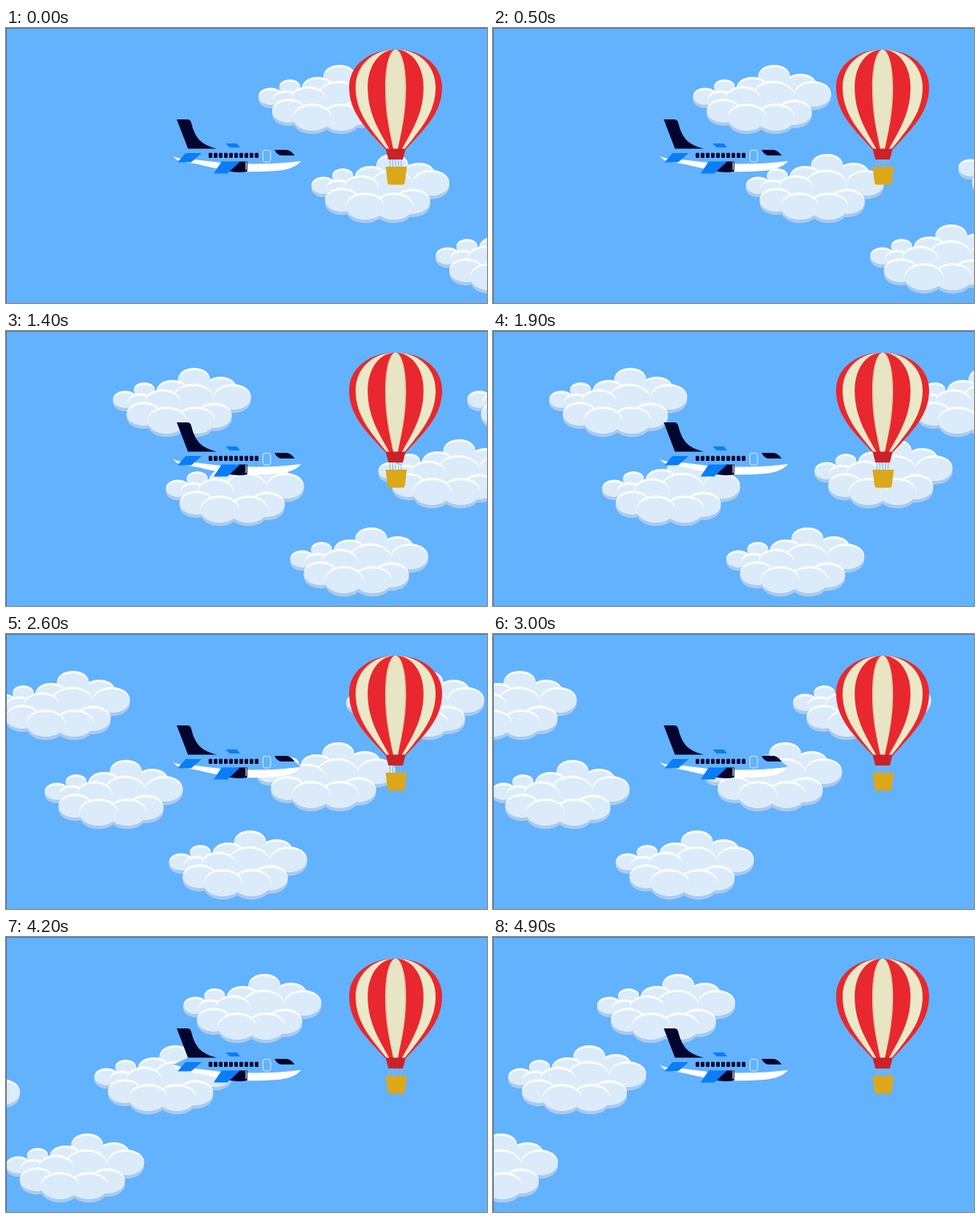
An HTML page that plays this animation: 600x343 px, repeating every 5 s.

```html
<!DOCTYPE html>
<html lang="en">
<head>
<meta charset="utf-8">
<title>Plane, balloon and clouds</title>
<style>
html, body { margin: 0; width: 100%; height: 100%; overflow: hidden; background: #62b2fe; }
svg { display: block; width: 100vw; height: 100vh; }
</style>
</head>
<body>
<svg viewBox="0 0 600 343" preserveAspectRatio="none">
  <defs>
    <g id="cloud"></g>
    <path id="bag" d="M0 27C34 27 58 47 58 74C58 106 36 126 13 151H-13C-36 126 -58 106 -58 74C-58 47 -34 27 0 27Z"/>
  </defs>
  <rect width="600" height="343" fill="#62b2fe"/>
  <g id="sky"></g>

  <g id="plane">
    <path fill="#62b2fe" d="M209 159L228 150H334Q352 150 368 166L310 172L240 168Z"/>
    <path fill="#fff" d="M208 159Q213 164 235 164L268 168Q320 172 368 166Q360 176 338 178Q315 180 290 179Q262 176 240 170L222 167Q212 166 208 159Z"/>
    <path fill="#04052e" d="M213 114H226Q230 114 231 118Q235 136 245 143Q252 148 263 150.5H227Z"/>
    <g fill="#0b7df7">
      <path d="M224 156H244L231 167.5H214Z"/>
      <path d="M274 144H288L292 149H279Z"/>
    </g>
    <path fill="#04052e" d="M290 166.5H301V179Q290 181 277 178.5Z"/>
    <path stroke="#fff" d="M299.5 167V177"/>
    <path fill="#0b7df7" d="M269 166.5H292L276 181.5H259Z"/>
    <g id="windows" fill="#04052e"></g>
    <rect x="320.5" y="152.5" width="9.5" height="14.5" rx="2.5" fill="none" stroke="#d5eaff"/>
    <path fill="#04052e" d="M335 152H350Q356 153 360 159H343Q338 158 335 152Z"/>
  </g>

  <g id="balloon" transform="translate(486)">
    <path stroke="#7db9ee" d="M-7 164V174M-3.5 164V174M0 164V174M3.5 164V174M7 164V174"/>
    <use href="#bag" fill="#e9272e"/>
    <use href="#bag" fill="#ece9c9" transform="scale(.86 1)"/>
    <use href="#bag" fill="#e9272e" transform="scale(.6 1)"/>
    <use href="#bag" fill="#d9d2ac" transform="scale(.225 1)"/>
    <use href="#bag" fill="#e8e5c4" transform="scale(.19 1)"/>
    <path fill="#cb2129" d="M-12.5 150.5H12.5L9 164H-9Z"/>
    <path fill="#dba71b" d="M-12.5 173H14L11.5 193Q11 195.5 8.500 195.5H-6.5Q-9.500 195.5 -10 193Z"/>
  </g>
  <path fill="none" stroke="#55789b" d="M0 .5H600M.5 0V343"/>
</svg>
<script>
const LOOP = 5000, STEP = 100;
const get = id => document.getElementById(id);

// Cloud lobes, back to front: x, y, radius
const lobes = [
  [134, 25, 20], [149, 36, 23], [101, 14, 20], [74, 29, 20], [39, 27, 13], [15, 39, 15], [34, 43, 16],
  [100, 38, 26], [62, 42, 22], [38, 57, 21], [126, 59, 22], [103, 65, 24], [67, 65, 24]
];
const lobe = (x, y, rx, ry, fill) =>
  `<ellipse cx="${x}" cy="${y}" rx="${rx}" ry="${ry}" fill="${fill}"/>`;
const shade = ([x, y, r]) => lobe(x, y + 4.5, r, r * .7, '#aacbeb');
const puff = ([x, y, r]) =>
  lobe(x, y, r, r * .7, '#fbfdff') + lobe(x, y + 1.5, r, r * .7 - 1.5, '#dbebf9');

get('cloud').innerHTML =
  lobes.map(shade).join('') + lobe(92, 48, 48, 20, '#dbebf9') + lobes.map(puff).join('');

// Starting place of each cloud
const starts = [[315, 46], [381, 157], [536, 245], [646, 135], [757, 46]];
get('sky').innerHTML = starts.map(() => '<use href="#cloud"/>').join('');
const clouds = [...get('sky').children];

get('windows').innerHTML = Array.from({ length: 10 }, (_, i) =>
  `<rect x="${252.8 + i * 6.4}" y="155.8" width="4.5" height="6.2" rx="1"/>`).join('');

// Steady drift to the left with a slight sway
const distance = t => .128 * t + 2.3 * Math.sin(2 * Math.PI * t / LOOP);

function draw(now) {
  const t = Math.floor(now % LOOP / STEP) * STEP;
  const d = distance(t);
  clouds.forEach((cloud, i) => {
    const [x, y] = starts[i];
    cloud.setAttribute('transform', `translate(${x - d} ${y})`);
  });
  requestAnimationFrame(draw);
}
draw(0);
</script>
</body>
</html>
```
